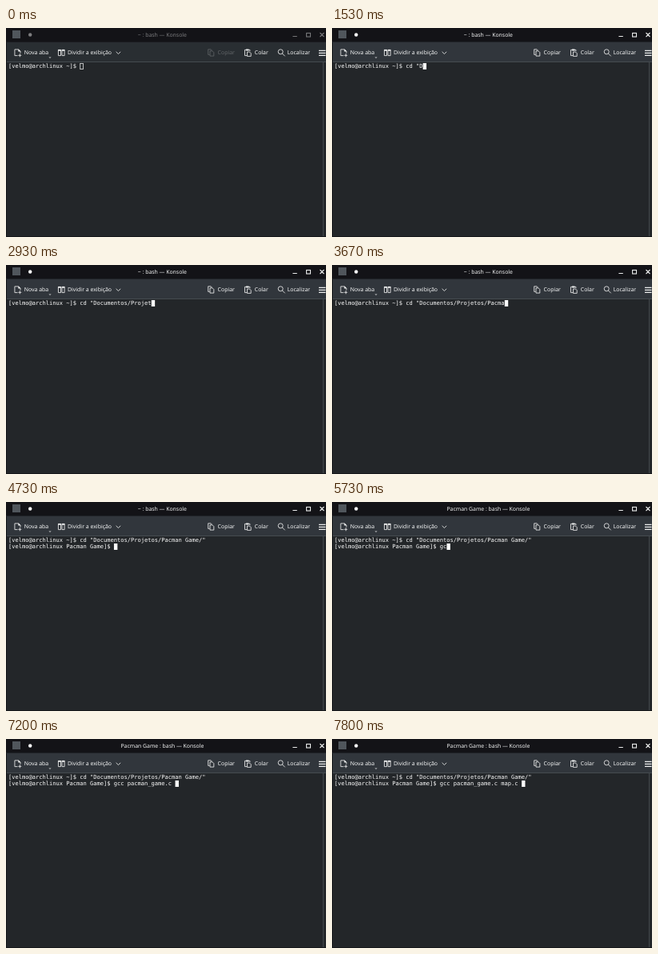
These frames come from a looping animation (400 by 262 pixels, 8000 ms). An HTML page:

```html
<!DOCTYPE html>
<html lang="pt">
<head>
<meta charset="utf-8">
<title>Terminal</title>
<style>
  html, body { margin: 0; width: 100%; height: 100%; overflow: hidden; background: #232629; }
  svg { display: block; }
  text { white-space: pre; text-rendering: geometricPrecision; }
  .ui { font: 6.92px "Noto Sans", sans-serif; fill: #f4f5f5; }
  .term { font: 7.07px "DejaVu Sans Mono", monospace; fill: #fcfcfc; }
  .line { fill: none; stroke: #eceded; stroke-width: .85; }
  .solid { fill: #eceded; }
</style>
</head>
<body>
<svg width="400" height="262" viewBox="0 0 400 262">
  <rect width="400" height="262" fill="#232629"/>
  <rect width="400" height="18" fill="#131317"/>
  <rect id="bar" y="17.5" width="400" height="24.5" fill="#31363c"/>
  <rect y="42" width="400" height="1" fill="#454b50"/>
  <rect y="18" width="1" height="244" fill="#15171a"/>
  <rect x="396" y="43" width="1" height="218" fill="#43494d"/>
  <rect y="261" width="400" height="1" fill="#15171a"/>

  <rect x="8" y="3" width="10" height="10" fill="#50565c"/>
  <g id="frame">
    <circle cx="30.2" cy="8.5" r="2.2" fill="#fcfcfc"/>
    <text id="title" class="ui" x="195.4" y="11" text-anchor="middle" style="font-size:6.86px"></text>
    <g class="line" style="stroke-width:1.1">
      <path d="M358.4 10.5h5.4M392.5 6l5 5m0-5l-5 5"/>
      <rect x="375.6" y="6.4" width="4.9" height="4.6"/>
    </g>
  </g>

  <g class="line">
    <path d="M14.5 34.6h-3.6v-7.7h4.9l2.2 2.2v2.4M17.3 32.3v4M15.3 34.3h4"/>
    <path d="M65.4 27.4h3.1v7.2h-3.1zM70 27.4h3.1v7.2H70z"/>
    <path d="M137.6 29.8l2.8 2.7 2.8-2.7"/>
    <path d="M304.9 29.2v-1.8h-6.4v7.2h2.5M301.5 30h3l1.7 1.7v3.7h-4.7z"/>
    <circle cx="343.2" cy="29.8" r="3"/>
    <path d="M345.4 32l3.3 3.3"/>
    <path d="M391 28.4h8.5M391 31.4h8.5M391 34.4h8.5" stroke-width="1.1"/>
  </g>
  <path class="solid" d="M15.3 26.6l3 3h-3zM65.2 27h3.5v1.7h-3.5zM69.8 27h3.5v1.7h-3.5zM300 26.4h3.4v2H300z"/>
  <path d="M53.4 36.6h3.2L55 38.1z" fill="#c8cacc"/>
  <g class="ui">
    <text x="22.7" y="33.3">Nova aba</text>
    <text x="77" y="33.3">Dividir a exibição</text>
    <text x="310.8" y="33.3">Colar</text>
    <text x="351.7" y="33.3">Localizar</text>
  </g>
  <g id="copy">
    <path class="line" d="M254.5 33.4h-1.8v-6.6h3.5l1.3 1.4M255 28.8h3l1.8 1.8v4.5H255z"/>
    <text class="ui" x="264.6" y="33.3">Copiar</text>
  </g>

  <text id="row0" class="term" x="3" y="50.1"></text>
  <text id="row1" class="term" x="3" y="58.2"></text>
  <rect id="cursor"/>
</svg>
<script>
const LOOP = 8000, CELL = 4.256, LEFT = 3, TOP = 44, LINE = 8;
const FOCUS = 130, FADE = 200, ENTER = 4730, RETITLE = 4800;
const $ = id => document.getElementById(id);

// Typing bursts: text, first and last keystroke. Keys are evenly spaced.
const rows = [
  { start: 0, prompt: '[velmo@archlinux ~]$ ', bursts: [
    ['cd ', 730, 930], ['"D', 1130, 1530], ['ocumentos', 1670, 2070],
    ['/Pr', 2270, 2530], ['ojetos/', 2670, 3070], ['Pacma', 3270, 3670],
    ['n ', 3730, 3800], ['Game/"', 4000, 4530]
  ] },
  { start: ENTER, prompt: '[velmo@archlinux Pacman Game]$ ', bursts: [
    ['gc', 5670, 5730], ['c pacman', 5870, 6270], ['_game', 6470, 6730],
    ['.c ', 6870, 7200], ['map.c', 7330, 7600], [' ', 7800, 7800]
  ] }
];

function typed([text, from, to], t) {
  if (t < from) return '';
  if (t >= to) return text;
  return text.slice(0, 1 + Math.floor((t - from) / (to - from) * (text.length - 1)));
}

function setText(id, s) {
  const el = $(id);
  if (el.textContent !== s) el.textContent = s;
}

function placeCursor(x, y, focused) {
  const inset = focused ? 0 : .4;
  const attrs = {
    x: x + inset, y: y + inset,
    width: 4.4 - 2 * inset, height: LINE - 2 * inset,
    fill: focused ? '#fcfcfc' : 'none',
    stroke: focused ? 'none' : '#e4e5e5',
    'stroke-width': 2 * inset
  };
  for (const k in attrs) $('cursor').setAttribute(k, attrs[k]);
}

function render(t) {
  // The window regains focus in four short steps.
  const f = Math.max(0, Math.min(4, 1 + Math.floor((t - FOCUS) / (FADE / 3)))) / 4;
  const fade = (id, low) => { $(id).style.opacity = low + (1 - low) * f; };
  fade('frame', .46);
  fade('copy', .27);
  fade('bar', .5);
  setText('title', (t < RETITLE ? '~' : 'Pacman Game') + ' : bash — Konsole');

  rows.forEach((row, i) => {
    const on = t >= row.start;
    const s = on ? row.prompt + row.bursts.map(b => typed(b, t)).join('') : '';
    setText('row' + i, s);
    if (on) placeCursor(LEFT + s.length * CELL, TOP + LINE * i, t >= FOCUS);
  });
}

const origin = performance.now();
function tick() {
  render((performance.now() - origin) % LOOP);
  requestAnimationFrame(tick);
}
tick();
</script>
</body>
</html>
```
